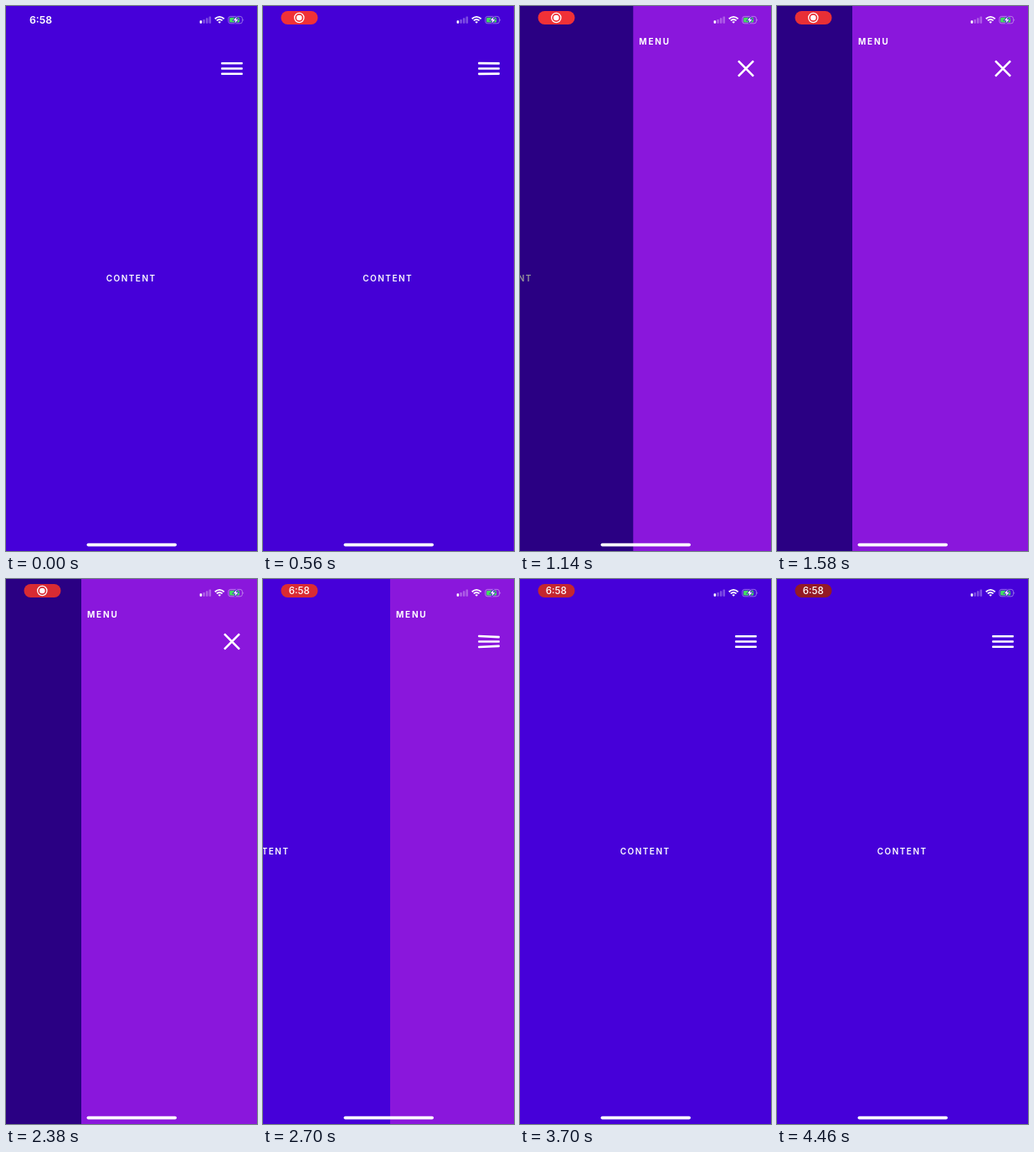
Animation of 300 by 649 pixels, one loop 4.48 s. Source, as an HTML page:

```html
<!DOCTYPE html>
<html lang="en">
<head>
<meta charset="utf-8">
<title>Drawer menu</title>
<style>
  html, body { margin: 0; width: 100%; height: 100%; overflow: hidden; background: #4600d9; }
  svg { display: block; width: 300px; height: 649px; }
  text { font-family: Inter, sans-serif; font-weight: 600; fill: #fff; }
  #content { font-size: 10px; letter-spacing: 1.48px; }
  #menu { font-size: 10px; font-weight: 700; letter-spacing: 1.8px; }
</style>
</head>
<body>
<svg viewBox="0 0 300 649">
  <rect width="300" height="649" fill="#4600d9"/>
  <text id="content" x="119.7" y="328">CONTENT</text>
  <rect id="shade" width="300" height="649"/>

  <g id="panel">
    <rect width="300" height="649" fill="#8a17dc"/>
    <text id="menu" x="7" y="46">MENU</text>
  </g>

  <g fill="#fff">
    <rect id="top" x="-12.9" y="-1.3" width="25.8" height="2.6" rx=".8"/>
    <rect id="middle" x="257.1" y="73.2" width="25.8" height="2.6" rx=".8"/>
    <rect id="bottom" x="-12.9" y="-1.3" width="25.8" height="2.6" rx=".8"/>
  </g>

  <text id="clock" x="41.5" y="21" font-size="12.3" text-anchor="middle">6:58</text>
  <g id="pill">
    <rect id="pillBack" x="21.5" y="6" width="44" height="16" rx="8"/>
    <g id="record">
      <circle cx="43.3" cy="14" r="5.6" fill="none" stroke="#fff" stroke-width="1.3"/>
      <circle cx="43.3" cy="14" r="3.3" fill="#fff"/>
    </g>
    <text id="pillClock" x="43.3" y="18" font-size="11.6" text-anchor="middle" style="font-weight:500">6:58</text>
  </g>

  <g fill="#fff">
    <rect x="231.6" y="17.2" width="2.6" height="3.5" rx=".7"/>
    <g opacity=".3">
      <rect x="235.3" y="15.9" width="2.6" height="4.8" rx=".7"/>
      <rect x="238.9" y="14.2" width="2.6" height="6.5" rx=".7"/>
      <rect x="242.5" y="12.4" width="2.6" height="8.3" rx=".7"/>
    </g>
    <g fill="none" stroke="#fff" stroke-width="1.8">
      <path d="M249.7 15.2Q255.2 10.6 260.7 15.2"/>
      <path d="M251.8 17.4Q255.2 14.7 258.6 17.4"/>
    </g>
    <path d="M253.4 18.9Q255.2 17.6 257 18.9L255.2 20.8Z"/>
    <rect x="265.8" y="12.4" width="16.6" height="8.4" rx="2.5" fill="none" stroke="#fff" stroke-opacity=".45" stroke-width=".9"/>
    <path d="M283.4 15.2Q285 16.6 283.4 18Z" opacity=".5"/>
    <rect x="267.1" y="13.7" width="12" height="5.8" rx="1.3" fill="#43dc62"/>
    <path d="M275.8 12.4L271.8 17.2H274.3L273.4 20.8L277.5 16H275Z" stroke="#4600d9" stroke-width="1.3" paint-order="stroke"/>
    <rect x="96.5" y="639.7" width="107.5" height="3.8" rx="1.9"/>
  </g>
</svg>
<script>
const LOOP = 4480, STEP = 20;
const OPEN = { start: 534, slide: 875 }, CLOSE = { start: 2397, slide: 829 };
const MORPH = 360, FADE = 240;
const el = id => document.getElementById(id);
const clamp = v => Math.min(1, Math.max(0, v));
const ease = v => (1 - Math.cos(Math.PI * clamp(v))) / 2;
const mix = (a, b, k) => a + (b - a) * k;

// 0 = closed, 1 = open
const openness = (t, opening, closing = opening) =>
  ease((t - OPEN.start) / opening) - ease((t - CLOSE.start) / closing);

// brightness of the pulsing recording pill: [time, level]
const pulse = [[0, 1], [1140, 1], [2380, .74], [2700, .76], [3060, .93], [4460, 0], [4480, 0]];
function glow(t) {
  const i = pulse.findIndex(p => p[0] > t);
  const [t0, a] = pulse[i - 1], [t1, b] = pulse[i];
  return mix(a, b, ease((t - t0) / (t1 - t0)));
}

function draw(t) {
  const shift = 210 * openness(t, OPEN.slide, CLOSE.slide);
  el('content').setAttribute('transform', `translate(${-shift})`);
  el('panel').setAttribute('transform', `translate(${300 - shift})`);
  el('shade').setAttribute('opacity', .4 * openness(t, FADE));

  const cross = openness(t, MORPH), gap = 6.3 * (1 - cross);
  el('top').setAttribute('transform', `translate(270 ${74.5 - gap}) rotate(${45 * cross})`);
  el('bottom').setAttribute('transform', `translate(270 ${74.5 + gap}) rotate(${-45 * cross})`);
  el('middle').setAttribute('opacity', 1 - cross);

  const recording = t >= 120, swap = ease((t - 2380) / 240), g = glow(t);
  el('clock').setAttribute('opacity', recording ? 0 : 1);
  el('pill').setAttribute('opacity', recording ? 1 : 0);
  el('pillBack').setAttribute('fill', `rgb(${mix(148, 240, g)}, ${mix(26, 49, g)}, ${mix(38, 55, g)})`);
  el('record').setAttribute('opacity', 1 - swap);
  el('pillClock').setAttribute('opacity', swap);
}

const start = performance.now();
function tick() {
  const t = (performance.now() - start) % LOOP;
  draw(Math.floor(t / STEP) * STEP);
  requestAnimationFrame(tick);
}
tick();
</script>
</body>
</html>
```
